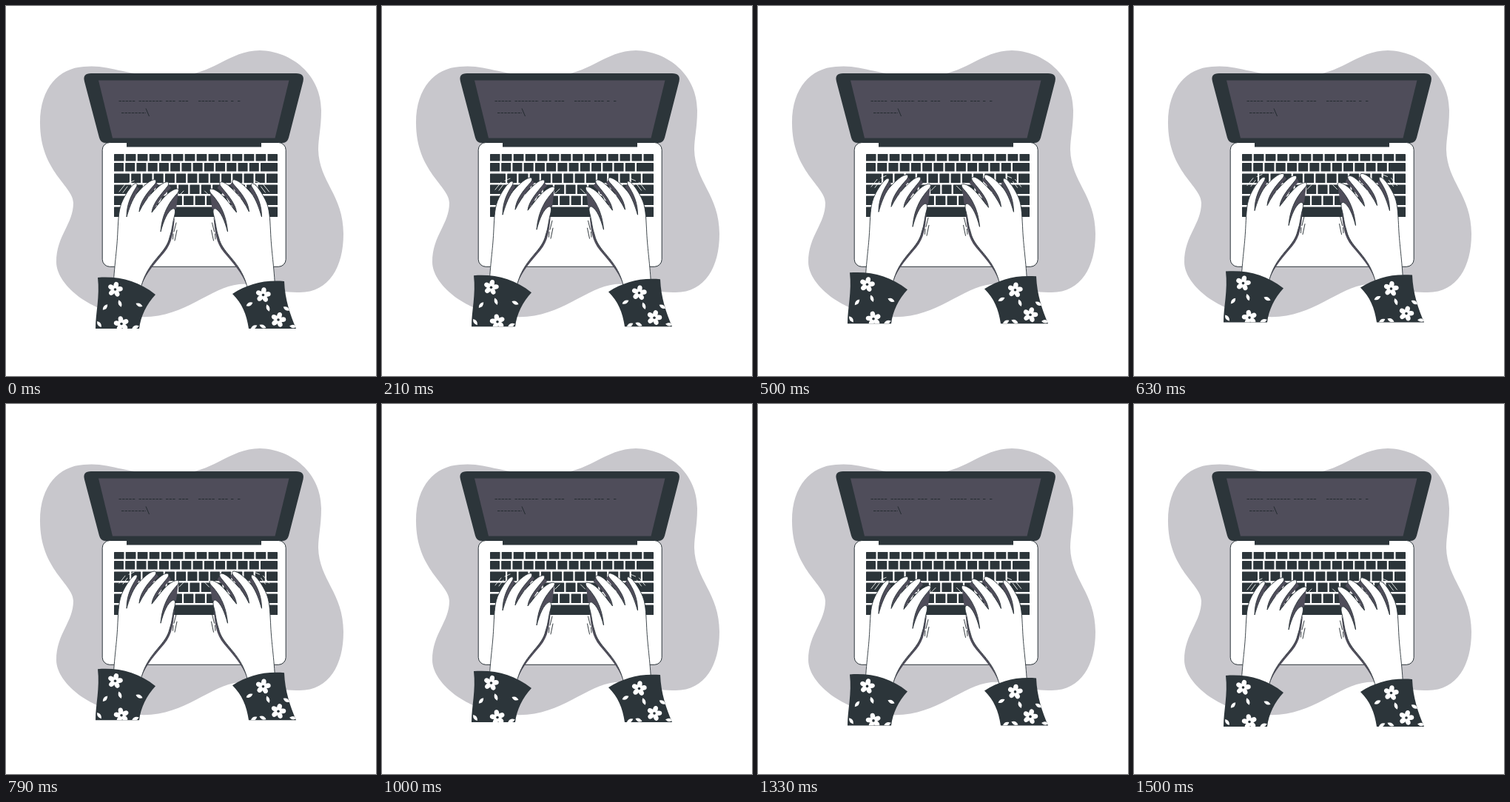
An HTML page for the animation above (1.54 s loop, 500 px wide and 500 px high).

```html
<!DOCTYPE html>
<html lang="en">
<head>
<meta charset="utf-8">
<title>Typing hands</title>
<style>
  html, body { margin: 0; width: 100%; height: 100%; overflow: hidden; background: #fff; }
  svg { display: block; width: 100%; height: 100%; }
  .dark { fill: #2c353a; }
  .shade { fill: #4f4d5a; }
  .skin { fill: #fff; stroke: #2c353a; stroke-width: .9; stroke-linejoin: round; }
  .ink, .glint { fill: none; stroke: #20282c; stroke-width: .9; stroke-linecap: round; }
  .glint { stroke: #f2f5f3; }
  .petal { fill: #fff; }
</style>
</head>
<body>
<svg viewBox="0 0 500 500">
  <defs>
    <path id="leftCuff" d="M124 367C153 365 178 371 202 390C190 403 182 419 180 436H121C121 415 127 393 124 367Z"/>
    <path id="rightCuff" d="M306 389C327 376 347 370 376 372C377 397 384 417 392 436H328C325 416 319 402 306 389Z"/>
    <clipPath id="leftClip"><use href="#leftCuff"/></clipPath>
    <clipPath id="rightClip"><use href="#rightCuff"/></clipPath>
    <g id="hand">
      <path class="shade" d="M221 303C222 316 216 326 206 338C196 350 187 362 183 378C190 360 202 347 214 333C225 320 226 305 228 286Z"/>
      <path class="shade" d="M163 285C161 270 167 256 176 243L180 247C172 258 169 272 163 285ZM180 278C179 264 189 250 202 237L206 242C193 254 187 267 180 278ZM197 279C197 266 210 251 219 240L223 246C210 257 204 269 197 279ZM209 305C210 282 220 266 233 250L230 274C218 279 214 292 209 305Z"/>
      <path class="skin" d="M145 378C147 345 150 330 151 304C152 287 152 274 158 262C162 254 167 246 172 241.500C176 238 179 240 176 245C169 256 163 268 163 285C166 275 170 262 177 253C184 245 192 237 199 235C203 234 204 237 201 241C191 252 181 264 180 278C185 268 191 259 198 252C205 245 211 239 216 238C220 237 221 240 218 244C210 254 198 267 197 279C202 273 209 263 215 257C222 250 228 247 232 247C234 248 234 251 230 255C221 265 211 280 209 305C213 290 218 278 225 274C229 273 229 277 228 282C225 292 225 302 221 313C219 322 213 330 206 338C196 350 186 362 181 386"/>
      <path class="ink" d="M230 293L227 305M226 308L225.500 315M231 303L228 317"/>
      <path class="glint" d="M153 251L161 241M158 252L164 244M166 239L173 236M190 264L193 258M206 266L210 260M234 256L240 250"/>
    </g>
  </defs>
  <path fill="#c8c7cc" d="M105 82C142 78 160 96 225 94C279 96 300 60 343 60C386 61 426 93 426 141C426 165 422 178 422 194C423 238 456 255 456 308C456 352 437 387 397 387C360 388 350 374 315 376C275 380 240 423 180 420C119 419 68 378 68 346C68 310 91 295 91 266C91 243 46 224 46 158C46 110 72 84 105 82Z"/>
  <path class="dark" d="M115 91H392Q404 91 401.500 102L382 178Q380 185 374 185H134Q128 185 126 178L106 102Q103 91 115 91Z"/>
  <path class="shade" d="M125 100.500H382.500L363.500 178.500H144Z"/>
  <g fill="none" stroke="#20282c" stroke-width=".9">
    <path stroke-dasharray="3.400 1.200" d="M152.500 128.500H175M179.500 128.500H212M216 128.500H229M233.500 128.500H247M260 128.500H282M287 128.500H300M304 128.500H308M313 128.500H317M156 144.500H189"/>
    <path d="M189 138.500L193.500 149"/>
  </g>
  <rect x="130.200" y="184.500" width="248" height="167.800" rx="10" fill="#fff" stroke="#2c353a"/>
  <path class="dark" d="M163 184H345V190.500H163Z"/>
  <g id="keys" class="dark"></g>
  <g id="typist">
    <use href="#hand"/>
    <use href="#hand" transform="matrix(-1 0 0 1 508.500 0)"/>
    <use href="#leftCuff" class="dark"/>
    <use href="#rightCuff" class="dark"/>
    <g id="leftPrint" class="petal" clip-path="url(#leftClip)"></g>
    <g id="rightPrint" class="petal" clip-path="url(#rightClip)"></g>
  </g>
</svg>
<script>
  const $ = id => document.getElementById(id);

  // Each row: top, height, number of keys, first and last key width.
  const rows = [
    [200, 9.5, 14, 13.5, 13.5],
    [212, 11.5, 14, 13, 23],
    [226.5, 12.5, 14, 21, 15],
    [241.5, 12.5, 13, 23.5, 26.5],
    [256.5, 12.5, 12, 30, 34]
  ];
  const rect = (x, y, w, h) => `<rect x="${x}" y="${y}" width="${w}" height="${h}" rx=".6"/>`;
  const gap = 2.2, left = 146, right = 367;
  let keys = '';
  for (const [y, h, n, first, last] of rows) {
    const pitch = (right - left - first - last - gap) / (n - 2);
    keys += rect(left, y, first, h) + rect(right - last, y, last, h);
    for (let i = 0; i < n - 2; i++)
      keys += rect(left + first + gap + i * pitch, y, pitch - gap, h);
  }
  for (const [x, w] of [[146, 14], [162, 14], [178, 15], [195, 18], [215, 84], [301, 18], [321, 14], [337, 14], [353, 14]])
    keys += rect(x, 271.5, w, 13.5);
  $('keys').innerHTML = keys;

  const flower = (x, y, turn) => {
    let out = '';
    for (let i = 0; i < 5; i++)
      out += `<ellipse cx="0" cy="-5.800" rx="3.300" ry="4.500" transform="translate(${x} ${y}) rotate(${turn + i * 72})"/>`;
    return out + `<circle cx="${x}" cy="${y}" r="3.500"/><circle class="dark" cx="${x}" cy="${y}" r="1.800"/>`;
  };
  const leaf = (x, y, turn) =>
    `<path d="M-5 0Q0 -4.500 5 0Q0 4.500 -5 0Z" transform="translate(${x} ${y}) rotate(${turn})"/>`;

  $('leftPrint').innerHTML = flower(147.5, 383, 12) + flower(156, 429.5, -10) +
    leaf(134, 407, -50) + leaf(180, 404, 25) + leaf(154, 402, 70) + leaf(126, 430, 55) + leaf(175, 434, -20);
  $('rightPrint').innerHTML = flower(347.5, 390.5, 8) + flower(368, 424, 15) +
    leaf(329, 403, -28) + leaf(354, 408, 70) + leaf(379, 409, 30) +
    leaf(335, 434, -30) + leaf(347, 433, 25) + leaf(388, 433, 5);

  // Steady bob: 10px up and back down.
  const loop = 1540, bob = 1500, lead = 25, rise = 10;
  const lift = t => {
    const p = (t + lead) % bob / bob;
    return rise * (1 - Math.abs(1 - 2 * p));
  };
  const start = performance.now();
  const draw = () => {
    const t = (performance.now() - start) % loop;
    $('typist').setAttribute('transform', `translate(0 ${(0.33 - lift(t)).toFixed(3)})`);
    requestAnimationFrame(draw);
  };
  draw();
</script>
</body>
</html>
```
